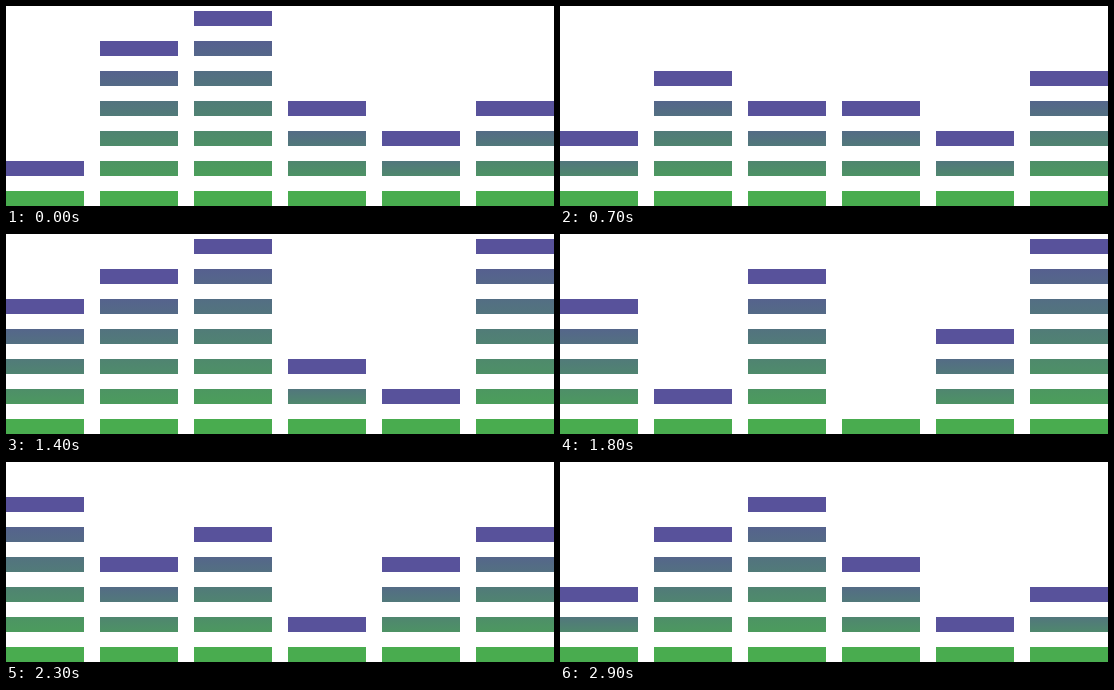
Animation of 548x200 px, one loop 3000 ms. Source, as an HTML page with a canvas:

```html
<!DOCTYPE html>
<html lang="en">
<head>
<meta charset="utf-8">
<title>Equalizer</title>
<style>
  html, body { margin: 0; width: 100%; height: 100%; overflow: hidden; background: #fff; }
  canvas { display: block; }
</style>
</head>
<body>
<canvas id="stage" width="548" height="200"></canvas>
<script>
const ctx = document.getElementById('stage').getContext('2d');
const PURPLE = '#58529b', GREEN = '#49ac4f';
const STEP_MS = 100, STEPS = 30;
const WIDTH = 78, BLOCK = 15, COLUMN_PITCH = 94, ROW_PITCH = 30, BASE = 185;

// Each column glides between these levels, reached at the given steps.
const keySteps = [0, 2, 5, 10, 12, 14, 18, 23, 27, 29, STEPS];
const columns = [
  [2, 1, 3, 2, 4, 5, 5, 6, 4, 3],
  [6, 6, 5, 4, 5, 6, 2, 4, 5, 5],
  [7, 6, 4, 5, 7, 7, 6, 5, 7, 6],
  [4, 5, 6, 2, 2, 3, 1, 2, 3, 4],
  [3, 3, 3, 2, 1, 2, 4, 4, 1, 2],
  [4, 5, 6, 3, 5, 7, 7, 5, 4, 3]
];

function levelAt(levels, step) {
  const next = keySteps.findIndex(key => key > step);
  const from = keySteps[next - 1], to = keySteps[next];
  const a = levels[next - 1], b = levels[next % levels.length];
  return Math.round(a + (b - a) * (step - from) / (to - from));
}

function drawColumn(x, level) {
  const rowY = row => BASE - row * ROW_PITCH;
  const shade = ctx.createLinearGradient(0, rowY(level - 1), 0, BASE + BLOCK);
  shade.addColorStop(0, PURPLE);
  shade.addColorStop(1, GREEN);
  for (let row = 0; row < level; row++) {
    ctx.fillStyle = row === 0 ? GREEN : row === level - 1 ? PURPLE : shade;
    ctx.fillRect(x, rowY(row), WIDTH, BLOCK);
  }
}

function draw() {
  const step = Math.floor(performance.now() / STEP_MS) % STEPS;
  ctx.clearRect(0, 0, 548, 200);
  columns.forEach((levels, i) => drawColumn(i * COLUMN_PITCH, levelAt(levels, step)));
  requestAnimationFrame(draw);
}
draw();
</script>
</body>
</html>
```
